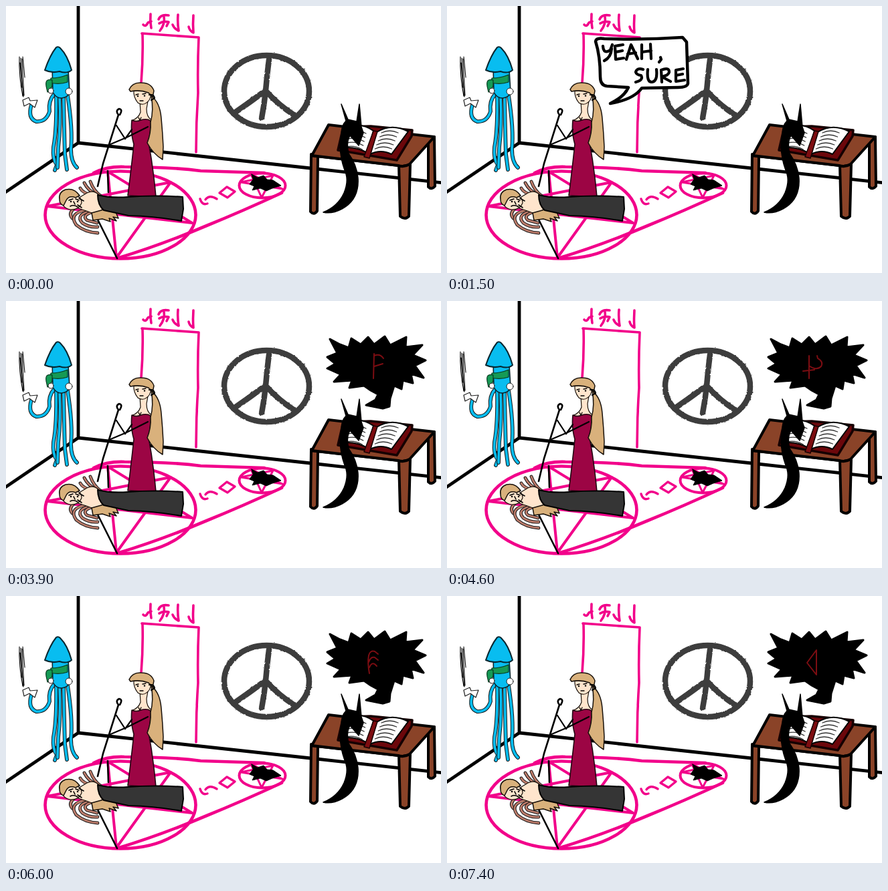
Recreate the animation shown at these times as an HTML page. Size 650 px wide and 400 px high, loop 8 s.

```html
<!DOCTYPE html>
<html lang="en">
<head>
<meta charset="utf-8">
<title>The ritual</title>
<style>
html, body { margin: 0; width: 100%; height: 100%; overflow: hidden; background: #fff; }
svg { display: block; width: 100%; height: 100%; }
path, ellipse, circle { stroke-linecap: round; stroke-linejoin: round; }
.line { fill: none; stroke: #000; }
.pink { fill: none; stroke: #f2008a; }
.red { fill: none; stroke: #7c0d12; stroke-width: 2; }
.ink { fill: #000; stroke: #000; }
.hair { fill: #d9b17c; stroke: #17100a; stroke-width: 1.5; }
.skin { fill: #ffe5cd; stroke: #17100a; stroke-width: 1.2; }
.wood { fill: #8a4328; stroke: #000; stroke-width: 4; }
.bubble { fill: #fff; stroke: #000; stroke-width: 4.5; }
.letters { fill: none; stroke: #000; stroke-width: 4.2; }
.chalk { fill: none; stroke: #3c3c3c; stroke-width: 8.5; }
</style>
</head>
<body>
<svg viewBox="0 0 650 400" preserveAspectRatio="none">
  <defs>
    <filter id="rough" x="-10%" y="-10%" width="120%" height="120%">
      <feTurbulence type="fractalNoise" baseFrequency=".2" numOctaves="2" seed="4"/>
      <feDisplacementMap in="SourceGraphic" scale="2.5" xChannelSelector="R" yChannelSelector="G"/>
    </filter>
  </defs>
  <rect width="650" height="400" fill="#fff"/>

  <path class="line" stroke-width="4.8" d="M108 -4V205L-4 281M108 205L455 243L654 265"/>

  <g id="door" class="pink" stroke-width="3.6">
    <path d="M202 115Q205 78 204 43L203 41Q246 44 288 47Q286 90 287 130Q284 175 284 219M202 115V125"/>
    <path d="M205 28Q209 32 212 25L217 23M216 12Q215 23 217 33"/>
    <path d="M228 20Q231 12 243 14M236 15Q238 27 230 37M229 26Q235 22 243 24L240 30"/>
    <path d="M257 13Q256 25 258 37Q251 34 249 28"/>
    <path d="M280 14Q279 27 280 40Q274 37 273 31"/>
  </g>

  <g id="peace" class="chalk" filter="url(#rough)">
    <ellipse cx="389.5" cy="127.5" rx="63.5" ry="53.5"/>
    <path d="M393 80Q390 103 388 127Q386 147 382 168M386 128Q366 143 340 161M390 129Q407 148 430 163"/>
  </g>

  <g id="squid">
    <path class="line" stroke-width="1.1" d="M20 76Q19 104 25 135M22 78Q23 108 26 136M24 79Q25 105 27 134M21 85L24 122M25 76L28 107"/>
    <g id="limbs"></g>
    <path d="M69 91L70 129Q74 138 83 138Q93 137 95 129L93 96Z" fill="#08bdf0" stroke="#07262f" stroke-width="1.6"/>
    <path d="M75 62Q66 73 58 96Q68 101 80 98Q91 102 98 96Q92 74 81 63Q78 60 75 62Z" fill="#08bdf0" stroke="#07262f" stroke-width="2"/>
    <path d="M67 108Q80 108 92 103V114Q80 118 66 115Z" fill="#159a55" stroke="#083b20" stroke-width="1.2"/>
    <path d="M69 111Q58 108 60 120L62 129Q67 127 69 119Z" fill="#159a55" stroke="#083b20" stroke-width="1.2"/>
    <g fill="#fff" stroke="#222" stroke-width="1"><circle cx="67" cy="127" r="4"/><circle cx="94" cy="128" r="5"/></g>
    <path d="M25 141L34 137L36 142L47 141L43 152L35 146L27 150Z" fill="#fff" stroke="#222" stroke-width="1.2"/>
  </g>

  <g id="circles" class="pink" stroke-width="4.6">
    <ellipse cx="171" cy="313" rx="112.5" ry="65.5"/>
    <path d="M62 300L246 264L165 377L152 248L278 325Z" stroke-width="4"/>
    <path d="M131 250Q151 240 177 241Q245 241 291 247L386 250M412 280Q354 307 300 329Q232 358 166 378"/>
    <ellipse cx="383" cy="269" rx="34.5" ry="18.5" stroke-width="4"/>
    <path d="M351 264L399 254L382 287L366 252L413 274Z" stroke-width="3"/>
    <path d="M290 289Q293 299 301 296M298 290Q304 282 315 289M330 271L342 278L331 287L319 280Z" stroke-width="3.4"/>
  </g>
  <path class="ink" d="M367 252L376 257L385 254L390 260L399 261L411 269L398 273L389 277L380 273L368 276L371 270L364 267L369 260Z"/>

  <g id="standing">
    <path class="line" stroke-width="2.6" d="M137 270L145 236L168 163Q163 157 169 154Q175 155 170 163M152 247L153 279M137 320L166 378"/>
    <path class="skin" d="M200 143L201 159Q198 168 189 171L190 184L213 185L218 171Q210 167 210 154L213 137Z"/>
    <path class="skin" d="M191 126Q190 136 197 145Q206 151 214 141Q219 132 213 126Z"/>
    <path class="hair" d="M184 125Q189 114 202 115Q217 115 221 127L219 137L213 130Q200 125 186 128Z"/>
    <path class="line" stroke-width="1.3" d="M194 133L198 132M204 132L209 131M200 142L205 142M198 167L200 171L202 167"/>
    <g fill="#000"><circle cx="197" cy="135" r="1.2"/><circle cx="207" cy="134.500" r="1.2"/></g>
    <path d="M188 171Q195 174 201 171Q211 168 216 172Q217 188 213 204Q220 242 224 286L182 284Q187 245 191 207Q186 190 188 171Z" fill="#9c0544" stroke="#210411" stroke-width="1.6"/>
    <path class="hair" d="M217 135Q230 144 232 168Q234 190 235 211L234 230Q220 222 211 205Q217 190 216 174Q221 156 217 135Z"/>
    <path class="line" stroke-width="2.2" d="M188 185L178 199L165 179M212 181L180 197L154 208M214 133Q221 132 222 138L217 141"/>
  </g>

  <g id="lying">
    <g id="strands"></g>
    <path class="skin" d="M111 286L121 280Q131 275 139 283L144 307Q132 313 120 307L108 303Z"/>
    <path class="skin" d="M83 290Q88 281 103 283Q113 286 113 295Q109 306 96 305Q84 303 83 290Z"/>
    <path class="hair" d="M80 290Q78 279 89 275Q102 272 110 284L104 287Q94 283 90 291L86 299Q80 297 80 290Z"/>
    <path class="line" stroke-width="1.6" d="M94 291L100 289M104 289L109 291M96 300Q101 297 107 301M101 293L103 297M109 288L116 292M107 298L113 302"/>
    <g fill="#000"><circle cx="97" cy="293" r="1.3"/><circle cx="107" cy="293" r="1.3"/></g>
    <path class="hair" d="M128 310L146 305L164 309L168 318L160 316L165 322L154 318L156 323L144 319L130 321Z"/>
    <path d="M137 283Q155 288 183 286Q225 283 264 286L265 304L262 322Q223 315 183 314L146 306Q137 298 137 283Z" fill="#353535" stroke="#000" stroke-width="2"/>
  </g>

  <g id="table">
    <path class="wood" d="M631 204L640 196L641 270Q636 276 631 271Z"/>
    <path class="wood" d="M456 222L466 226L465 307Q460 314 455 308Z"/>
    <path class="wood" d="M587 238L604 237L602 315Q596 321 589 315Z"/>
    <path class="wood" d="M482 178L640 196L603 237Q595 242 586 239L457 224Z"/>
    <path class="line" stroke-width="2.5" d="M457 225L589 240L604 237"/>
    <path d="M504 181L545 180L607 186L606 195L584 231L496 216Z" fill="#6c070b" stroke="#160102" stroke-width="3.5"/>
    <path d="M508 181Q531 174 549 187L540 220Q521 209 499 213Z" fill="#fff" stroke="#000" stroke-width="2"/>
    <path d="M554 189Q576 175 601 188L576 222Q560 214 544 222Z" fill="#fff" stroke="#000" stroke-width="2"/>
    <path d="M549 187L555 188L543 228L535 226Z" fill="#7d0c10" stroke="#160102" stroke-width="1.5"/>
    <g id="writing"></g>
  </g>

  <path id="imp" class="ink" stroke-width="1.5" d="M501 147L511 170L524 173L528 147L531 181L534 190L527 209L514 194Q508 204 512 221Q524 238 526 258Q528 290 502 304Q487 312 474 309Q496 300 505 280Q513 261 506 246Q496 218 501 193Q501 179 508 172Z"/>

  <g id="ready" aria-label="Ready?">
    <path class="bubble" d="M472 34Q542 38 607 33Q616 40 613 57L615 87Q608 98 593 95L547 97Q540 120 530 138Q532 116 527 97L476 95Q464 92 466 78Q470 51 465 39Q466 34 472 34Z"/>
    <path class="letters" d="M477 82L477 60Q490 54 491 62Q489 69 478 71L494 82M511 57L499 59L500 81L513 79M500 70L510 68M519 82L528 57L538 80M522 73L534 71M543 57L545 79Q561 75 557 64Q553 57 543 57M563 57Q564 70 575 65L579 55M577 61Q577 78 567 84M586 56Q593 47 602 55Q605 61 595 66L594 72M593 81L593.5 82"/>
  </g>

  <g id="sure" aria-label="Yeah, sure">
    <path class="bubble" d="M222 53Q223 47 235 49Q295 51 352 47L358 54L360 116Q359 122 345 122L291 123Q279 140 244 146Q265 136 271 122L239 120Q229 119 229 106Q229 75 222 53Z"/>
    <path class="letters" d="M233 60Q234 73 244 66L247 58M246 64Q245 77 235 82M263 58L251 60L252 80L264 78M252 69L262 67M268 80L275 58L285 79M270 72L282 70M291 58L291 79M304 57L305 79M291 69L305 67M319 77L320 80L317 84M293 95Q284 92 282 99Q283 103 290 104Q294 111 282 114M300 95Q298 114 306 114Q315 113 313 95M321 114L320 96Q332 91 332 99Q331 104 321 106L334 113M353 94L342 96L342 113L355 111M342 104L352 102"/>
  </g>

  <g id="dark">
    <path class="ink" stroke-width="3" d="M484 57L499 65L512 70L516 56L530 65L541 54L550 65L566 53L574 66L598 54L597 69L622 66L608 81L627 89L611 97L624 115L605 109L608 123L593 119L591 132L580 127L574 146L573 158L563 161L538 156L552 148L556 140L545 134L535 127L513 130L517 119L490 121L500 110L480 101L492 94L480 84L495 78Z"/>
    <path id="rune" class="red"/>
  </g>
</svg>
<script>
const $ = id => document.getElementById(id);

function add(parent, d, color, width) {
  const path = document.createElementNS("http://www.w3.org/2000/svg", "path");
  path.setAttribute("d", d);
  path.setAttribute("fill", "none");
  path.setAttribute("stroke", color);
  path.setAttribute("stroke-width", width);
  $(parent).append(path);
}

// A wide dark stroke below a narrower coloured one.
function tube(parent, d, color, width) {
  add(parent, d, "#151515", width + 2);
  add(parent, d, color, width);
}

[
  "M72 132Q63 142 65 158Q60 174 45 173Q32 168 38 148",
  "M75 134Q76 185 71 211Q69 229 76 238L73 246",
  "M80 136Q82 180 78 212L77 242",
  "M86 136Q87 190 88 222L91 245",
  "M92 134Q100 186 97 214Q97 234 106 242"
].forEach(d => tube("limbs", d, "#08bdf0", 3.8));

[
  "M137 284Q122 276 117 265", "M142 285Q131 277 126 263",
  "M130 283Q115 281 111 273", "M101 304Q93 311 99 318",
  "M122 305Q92 310 105 328Q118 339 137 340", "M126 307Q103 313 114 325Q124 332 137 331",
  "M128 309Q113 314 121 321L136 325"
].forEach(d => tube("strands", d, "#bd7c6b", 2.8));

for (let i = 0; i < 5; i++) {
  const y = 187 + i * 6;
  add("writing", `M${514 - i * 1.4} ${y}q12 -3 24 4`, "#333", 1.3);
  add("writing", `M${561 - i * 2.4} ${y + 3}q12 -6 25 0`, "#333", 1.3);
}

const runes = [
  "M550 80L564 95L550 111L537 95Z",
  "M549 81Q552 99 549 119M550 93Q560 83 565 93Q561 102 550 104",
  "M550 79L549 116M550 82Q559 78 564 86M550 98L563 94",
  "M541 82L541 116M532 105L549 103M541 97Q552 105 559 98Q563 91 554 86L553 82",
  "M546 82Q543 99 545 119M530 92Q543 88 557 92M545 106L532 113",
  "M543 116Q540 100 542 89Q544 81 551 83L556 87M542 99Q545 90 551 92L556 96M543 107Q546 99 551 102L554 105",
  "M549 75Q545 95 548 116M534 84Q535 103 547 101Q560 100 561 84",
  "M552 81L538 100L552 118Z"
];

function show(id, visible) {
  $(id).style.display = visible ? "" : "none";
}

function draw(now) {
  const t = now % 8000;
  show("ready", t >= 500 && t < 1500);
  show("sure", t >= 1500 && t < 2500);
  show("dark", t >= 2500);
  if (t >= 2500) $("rune").setAttribute("d", runes[Math.floor((t - 2500) / 700)]);
}

const start = performance.now();
function tick() {
  draw(performance.now() - start);
  requestAnimationFrame(tick);
}
tick();
</script>
</body>
</html>
```
